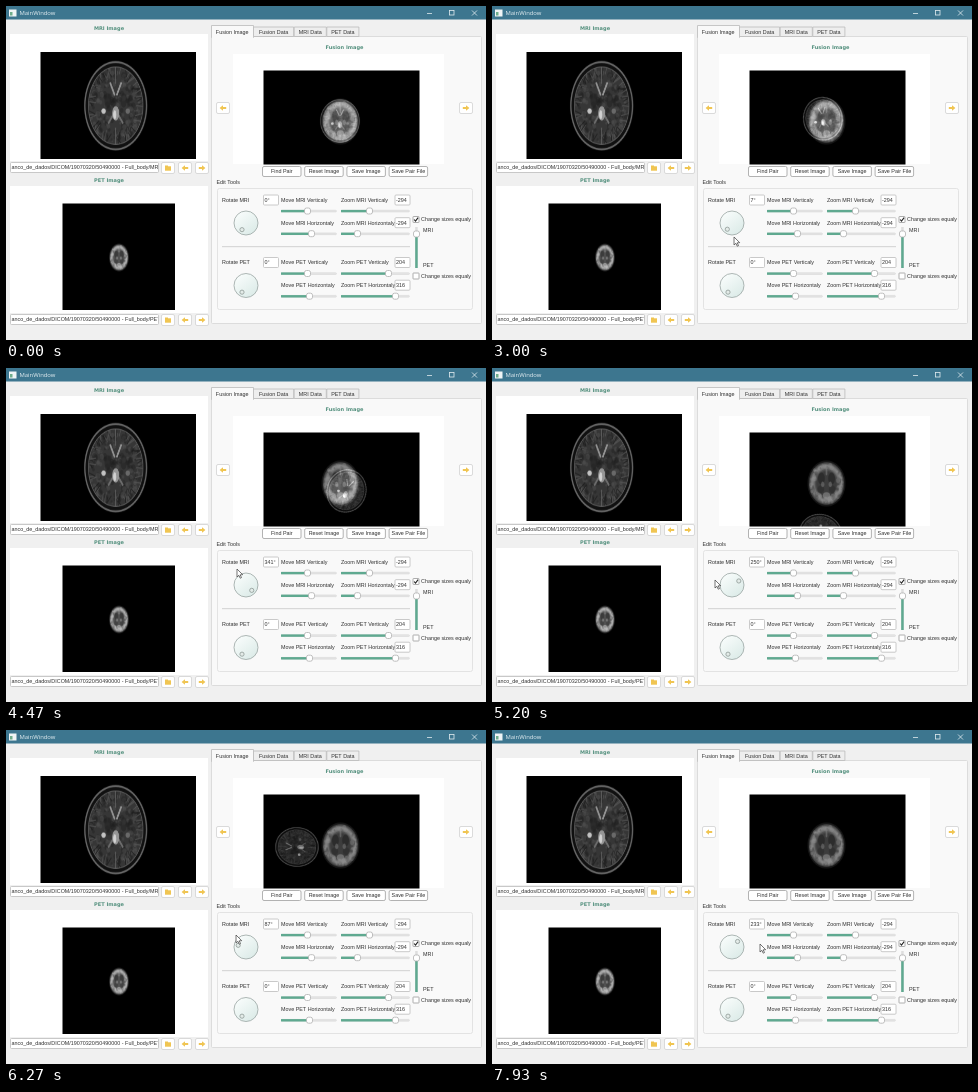
An HTML page with a canvas that plays this animation: 480x334 px, repeating every 8 s.

```html
<!DOCTYPE html>
<html lang="en">
<head>
<meta charset="utf-8">
<title>MainWindow</title>
<style>
  html, body { margin: 0; width: 100%; height: 100%; overflow: hidden; background: #f0f0f0; }
  canvas { display: block; width: 480px; height: 334px; }
</style>
</head>
<body>
<canvas id="stage"></canvas>
<script>
const LOOP = 8000, TAU = Math.PI * 2;
const PANE = '#f9f9f9', GREEN = '#5fa990', YELLOW = '#f0c552', TEXT = '#303030';
const stage = document.getElementById('stage');
const dpr = window.devicePixelRatio || 1;
stage.width = 480 * dpr;
stage.height = 334 * dpr;
const c = stage.getContext('2d');
c.scale(dpr, dpr);
c.imageSmoothingQuality = 'high';

// Degrees are unwrapped, so the dial runs backwards through zero and then turns forward again.
const TURNS = [
  { at: 2400, deg: 0 }, { at: 3000, deg: 7 }, { at: 3330, deg: -1 }, { at: 4470, deg: -19 },
  { at: 5200, deg: -110 }, { at: 5530, deg: -240 }, { at: 6270, deg: -273 }, { at: 7930, deg: -127 }
];
const POINTER = [
  { at: 130, x: 285, y: 258 }, { at: 1070, x: 235, y: 221 }, { at: 2000, x: 235, y: 221 },
  { at: 3000, x: 242, y: 231 }, { at: 3700, x: 256, y: 220 }, { at: 4470, x: 231, y: 201 },
  { at: 5200, x: 223, y: 212 }, { at: 6270, x: 230, y: 205 }, { at: 7930, x: 268, y: 214 }
];

function tween(keys, prop, t) {
  const next = keys.find(k => k.at > t) || keys[keys.length - 1];
  const prev = keys[Math.max(0, keys.indexOf(next) - 1)];
  const p = next === prev ? 0 : Math.min(1, Math.max(0, (t - prev.at) / (next.at - prev.at)));
  return prev[prop] + (next[prop] - prev[prop]) * p;
}

function randomizer(seed) {
  return () => (seed = (seed * 16807) % 2147483647) / 2147483647;
}

// ---- scans, painted once in a unit circle ----
function makeScan(paint, seed) {
  const scan = document.createElement('canvas');
  scan.width = scan.height = 256;
  const g = scan.getContext('2d');
  g.translate(128, 128);
  g.scale(124, 124);
  g.lineCap = 'round';
  const gray = (v, a) => `rgba(${v},${v},${v},${a})`;
  const oval = (x, y, rx, ry, v, a = 1) => {
    g.fillStyle = gray(v, a);
    g.beginPath();
    g.ellipse(x, y, rx, ry, 0, 0, TAU);
    g.fill();
  };
  const ring = (r, width, v, a = 1) => {
    g.strokeStyle = gray(v, a);
    g.lineWidth = width;
    g.beginPath();
    g.arc(0, 0, r, 0, TAU);
    g.stroke();
  };
  const streak = (x1, y1, x2, y2, width, v, a = 1) => {
    g.strokeStyle = gray(v, a);
    g.lineWidth = width;
    g.beginPath();
    g.moveTo(x1, y1);
    g.lineTo(x2, y2);
    g.stroke();
  };
  paint({ oval, ring, streak, rnd: randomizer(seed) });
  return scan;
}

const mri = makeScan(({ oval, ring, streak, rnd }) => {
  oval(0, 0, 1, 1, 16);
  ring(.97, .04, 105);
  oval(0, 0, .87, .87, 54);
  for (let i = 0; i < 180; i++) {
    const a = rnd() * TAU, r = Math.sqrt(rnd()) * .82, size = .03 + rnd() * .05;
    oval(Math.cos(a) * r, Math.sin(a) * r, size, size, i % 2 ? 85 : 30, .4);
  }
  for (let i = 0; i < 60; i++) {
    const a = rnd() * TAU, b = a + (rnd() - .5) * .3, r = .6 + rnd() * .15;
    streak(Math.cos(a) * .84, Math.sin(a) * .84, Math.cos(b) * r, Math.sin(b) * r, .025, i % 2 ? 90 : 26, .7);
  }
  ring(.86, .02, 95);
  for (const side of [-1, 1]) {
    streak(0, side * .85, 0, side * .5, .025, 105);
    streak(side * .04, -.25, side * .17, -.5, .05, 150);
    streak(side * .04, .15, side * .22, .38, .05, 110);
    oval(side * .25, -.12, .1, .16, 36, .6);
    oval(side * .38, .12, .07, .06, side < 0 ? 195 : 105);
  }
  oval(0, .17, .11, .16, 150);
  oval(-.03, .2, .05, .1, 210);
}, 71);

const pet = makeScan(({ oval, ring, streak, rnd }) => {
  oval(0, 0, 1, 1, 28);
  oval(0, 0, .93, .93, 80);
  for (let i = 0; i < 12; i++) ring(.73 + Math.sin(i) * .05, .06 + i * .022, 200, .1);
  for (let i = 0; i < 90; i++) {
    const a = rnd() * TAU, r = .62 + rnd() * .25, size = .05 + rnd() * .06;
    oval(Math.cos(a) * r, Math.sin(a) * r, size, size, i % 3 ? 190 : 85, .35);
  }
  for (const side of [-1, 1]) {
    oval(side * .27, -.22, .18, .26, 48, .65);
    oval(side * .3, .25, .18, .17, 58, .6);
    oval(side * .2, .04, .09, .12, 140, .7);
  }
  streak(0, -.7, 0, -.4, .09, 165, .6);
  oval(0, .52, .2, .14, 190, .6);
}, 913);

function drawScan(scan, x, y, rx, ry) {
  const k = 128 / 124;
  c.drawImage(scan, x - rx * k, y - ry * k, rx * 2 * k, ry * 2 * k);
}

// ---- interface helpers ----
function rect(x, y, w, h, fill) {
  c.fillStyle = fill;
  c.fillRect(x, y, w, h);
}

function clipTo(x, y, w, h, paint) {
  c.save();
  c.beginPath();
  c.rect(x, y, w, h);
  c.clip();
  paint();
  c.restore();
}

function box(x, y, w, h, { fill = '#fff', line = '#bdbdbd', r = 1, width = .8 } = {}) {
  c.beginPath();
  c.roundRect(x + .5, y + .5, w - 1, h - 1, r);
  c.fillStyle = fill;
  c.fill();
  c.strokeStyle = line;
  c.lineWidth = width;
  c.stroke();
}

function disc(x, y, r, fill, line) {
  c.beginPath();
  c.arc(x, y, r, 0, TAU);
  c.fillStyle = fill;
  c.fill();
  c.strokeStyle = line;
  c.lineWidth = .8;
  c.stroke();
}

function line(points, color, width = .8) {
  c.beginPath();
  points.forEach(([x, y]) => c.lineTo(x, y));
  c.strokeStyle = color;
  c.lineWidth = width;
  c.stroke();
}

function label(text, x, y, { font = '5.4px "Liberation Sans", sans-serif', color = TEXT, align = 'left' } = {}) {
  c.font = font;
  c.fillStyle = color;
  c.textAlign = align;
  c.fillText(text, x, y + 1.9);
}

function heading(text, x, y) {
  label(text, x, y, { font: 'bold 5.05px "DejaVu Sans", sans-serif', color: '#55917f', align: 'center' });
}

function field(text, x, y, w = 16) {
  box(x, y, w, 11);
  clipTo(x + 1, y, w - 2, 11, () => label(text, x + 1.5, y + 5.5));
}

function button(text, x, w) {
  box(x, 160, w, 11, { line: '#a0a0a0', r: 1.5 });
  label(text, x + w / 2, 165.5, { align: 'center' });
}

function iconButton(x, y, paint) {
  box(x, y, 14, 12, { line: '#d2d2d2', r: 1.5 });
  c.fillStyle = YELLOW;
  c.save();
  c.translate(x + 7, y + 6);
  paint();
  c.restore();
}

function arrowButton(x, y, dir) {
  iconButton(x, y, () => {
    c.scale(dir, 1);
    c.fillRect(-3.2, -1, 3.7, 2);
    c.beginPath();
    c.moveTo(0, -2.7);
    c.lineTo(3.4, 0);
    c.lineTo(0, 2.7);
    c.fill();
  });
}

function folderButton(x, y) {
  iconButton(x, y, () => {
    c.fillRect(-3, -2.5, 3, 2);
    c.fillRect(-3, -1.7, 6, 4.4);
  });
}

function slider(x, y, w, handle) {
  box(x, y - 1.3, w, 2.8, { fill: '#e4e4e4', line: '#d3d3d3', width: .5 });
  rect(x, y - 1.1, handle - x, 2.4, GREEN);
  box(handle - 3, y - 3.5, 7, 7, { line: '#b0b0b0', r: 2 });
}

function dial(x, y, value) {
  const shade = c.createLinearGradient(x - 8, y - 10, x + 8, y + 10);
  shade.addColorStop(0, '#f8fcfb');
  shade.addColorStop(1, '#dcebe8');
  disc(x, y, 12, shade, '#9aa5a2');
  // the knob sweeps 300 degrees, starting 30 degrees left of the bottom
  const a = (30 + value * 300 / 360) * TAU / 360;
  disc(x - Math.sin(a) * 8, y + Math.cos(a) * 7.7, 2.1, '#e3ebe8', '#8f9a96');
}

function checkbox(x, y, checked) {
  box(x, y, 7, 7, { line: '#9a9a9a', r: .5 });
  if (checked) line([[x + 1.6, y + 3.5], [x + 3, y + 5.1], [x + 5.6, y + 1.7]], '#222', 1.1);
  label('Change sizes equaly', x + 8.5, y + 3.5);
}

function toolRows(kind, y, value, rows) {
  label('Rotate ' + kind, 216, y);
  field(value + '°', 257, y - 5.5);
  dial(240, y + 23, value);
  rows.forEach(({ axis, move, zoom, amount }, i) => {
    const row = y + i * 22.7;
    label(`Move ${kind} ${axis}`, 275, row);
    label(`Zoom ${kind} ${axis}`, 335, row);
    field(amount, 388.5, row - 5.5);
    slider(275, row + 11, 56, move);
    slider(335, row + 11, 69, zoom);
  });
}

function sourcePanel(kind, y) {
  const below = y + 128;
  heading(kind + ' Image', 103, y - 6);
  rect(4, y, 198, 127, '#fff');
  field('anco_de_dados/DICOM/19070320/50490000 - Full_body/' + kind, 4, below, 149);
  folderButton(155, below);
  arrowButton(172, below, -1);
  arrowButton(189, below, 1);
}

function titleBar() {
  rect(0, 0, 480, 13.5, '#3d768f');
  rect(3, 3.5, 7.5, 7, '#f0f5f6');
  rect(4, 6, 2.5, 3.5, '#6fae8c');
  label('MainWindow', 13.5, 7, { font: '5.9px "Open Sans", sans-serif', color: '#e4eef2' });
  line([[421, 7.5], [426, 7.5]], '#dfeaee');
  c.strokeRect(443.5, 4.5, 4.5, 4.5);
  for (const s of [-1, 1]) line([[466, 7 - s * 2.5], [471, 7 + s * 2.5]], '#dfeaee');
}

function tabs() {
  box(205, 30, 271, 288, { fill: PANE, line: '#d6d6d6' });
  let x = 247;
  for (const text of ['Fusion Data', 'MRI Data', 'PET Data']) {
    const w = text.length * 2.7 + 11.5;
    box(x, 20.5, w, 10.5, { fill: '#eeeeee', line: '#bababa', r: 0 });
    label(text, x + w / 2, 26, { align: 'center' });
    x += w - .5;
  }
  box(205, 19, 43, 13, { fill: PANE, line: '#bababa', r: 0 });
  rect(206, 30.3, 41, 2, PANE);
  label('Fusion Image', 226.2, 25.7, { align: 'center' });
}

function fusion(value, showMri) {
  heading('Fusion Image', 338.5, 41);
  rect(227, 48, 211, 110, '#fff');
  clipTo(257.5, 64.5, 156, 94, () => {
    rect(257, 64, 157, 95, '#000');
    c.globalCompositeOperation = 'lighter';
    c.globalAlpha = .75;
    drawScan(pet, 334.5, 115.5, 19, 23);
    if (!showMri) return;
    // the overlay turns about a point below its own centre
    c.translate(313.5, 138.65);
    c.rotate(-value * TAU / 360);
    drawScan(mri, 20.45, -23.65, 20, 22);
  });
  arrowButton(210, 96, -1);
  arrowButton(453, 96, 1);
}

function editTools(value) {
  ['Find Pair', 'Reset Image', 'Save Image', 'Save Pair File']
    .forEach((text, i) => button(text, 256 + i * 42.2, 39.5));
  label('Edit Tools', 210.5, 176.5);
  box(211, 182, 256, 122, { fill: PANE, line: '#dddddd', r: 2 });
  toolRows('MRI', 194, value, [
    { axis: 'Verticaly', move: 301, zoom: 363, amount: '-294' },
    { axis: 'Horizontaly', move: 305, zoom: 351, amount: '-294' }
  ]);
  line([[216, 240.7], [404, 240.7]], '#c6c6c6');
  toolRows('PET', 256.5, 0, [
    { axis: 'Verticaly', move: 301, zoom: 382, amount: '204' },
    { axis: 'Horizontaly', move: 303, zoom: 389, amount: '316' }
  ]);
  checkbox(406.5, 210, true);
  checkbox(406.5, 266.5, false);
  rect(409.2, 221, 2.5, 41, '#dedede');
  rect(409.2, 228, 2.5, 34, GREEN);
  box(407, 224.5, 7, 7, { line: '#b0b0b0', r: 2 });
  label('MRI', 417, 224.5);
  label('PET', 417, 259);
}

function pointer(x, y) {
  c.beginPath();
  [[0, 0], [0, 8], [1.9, 6.3], [3.2, 9.2], [4.5, 8.6], [3.2, 5.8], [5.7, 5.7]]
    .forEach(([px, py]) => c.lineTo(x + px, y + py));
  c.closePath();
  c.fillStyle = '#fff';
  c.fill();
  c.strokeStyle = '#3a3a3a';
  c.lineWidth = .7;
  c.stroke();
}

function draw() {
  const t = performance.now() % LOOP;
  const value = (Math.round(tween(TURNS, 'deg', t)) + 360) % 360;
  rect(0, 0, 480, 334, '#f0f0f0');
  titleBar();
  sourcePanel('MRI', 28);
  rect(34.5, 46, 155.5, 107, '#000');
  drawScan(mri, 109.7, 99.7, 31.8, 45);
  sourcePanel('PET', 180);
  rect(56.5, 197.5, 112.5, 106.5, '#000');
  drawScan(pet, 113, 251.5, 10, 14);
  tabs();
  fusion(value, t < 7900);
  editTools(value);
  if (t >= 130) pointer(tween(POINTER, 'x', t), tween(POINTER, 'y', t));
  requestAnimationFrame(draw);
}
draw();
</script>
</body>
</html>
```
